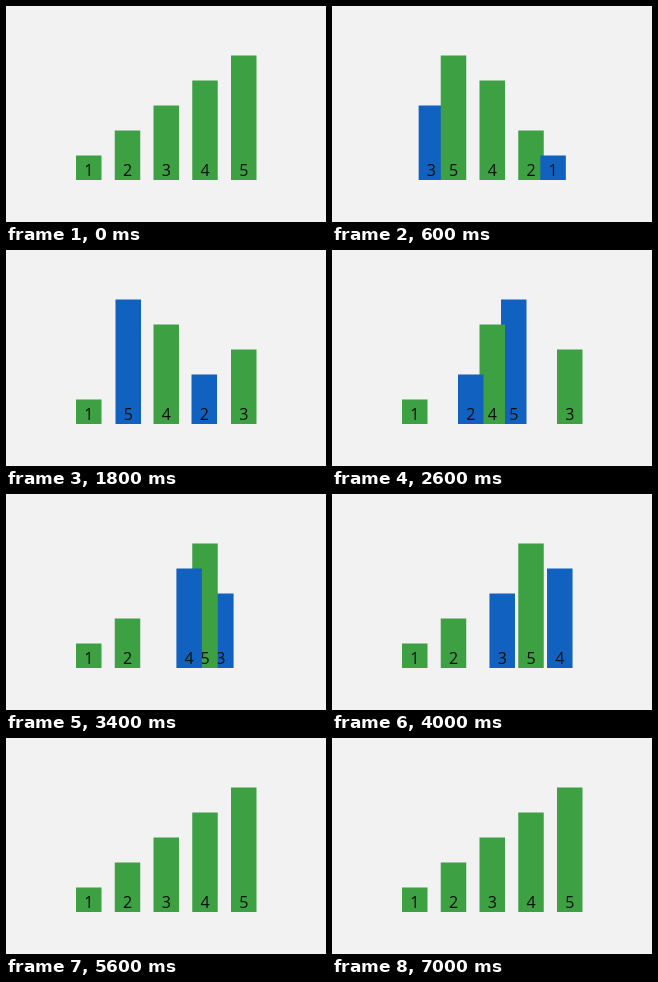
Recreate the animation shown at these times as an HTML page with a canvas. Size 320 by 216 pixels, loop 7.2 s.

```html
<!DOCTYPE html>
<html lang="en">
<head>
<meta charset="utf-8">
<title>Sorting bars</title>
<style>
  html, body { margin: 0; width: 100%; height: 100%; overflow: hidden; background: #f2f2f2; }
  canvas { display: block; width: 320px; height: 216px; }
</style>
</head>
<body>
<canvas id="stage"></canvas>
<script>
const W = 320, H = 216, LOOP = 7200, STEP = 200;
const LEFT = 70, PITCH = 38.75, BAR = 25.5, UNIT = 25, BASE = 174;
const GREEN = '#3da043', BLUE = '#1061c0';
const START = [3, 5, 4, 2, 1];
const SWAPS = [[0, 4], [1, 3], [2, 4], [3, 4]];
const FIRST = 488, PERIOD = 1302, MOVE = 1042;

const canvas = document.getElementById('stage');
const ctx = canvas.getContext('2d');
const ratio = window.devicePixelRatio || 1;
canvas.width = W * ratio;
canvas.height = H * ratio;
ctx.scale(ratio, ratio);
ctx.font = '16px "Open Sans", "Noto Sans", sans-serif';
ctx.textAlign = 'center';

function drawBar(value, slot, active) {
  const x = LEFT + slot * PITCH;
  const height = value * UNIT - 0.5;
  ctx.fillStyle = active ? BLUE : GREEN;
  ctx.fillRect(x, BASE - height, BAR, height);
  ctx.fillStyle = '#0b0f0b';
  ctx.fillText(value, x + BAR / 2, 170);
}

// Slot of every value, plus the pair being exchanged at this time.
function layout(time) {
  const order = START.slice();
  const slots = {};
  let moving = [];
  SWAPS.forEach(([a, b], i) => {
    const p = (time - FIRST - i * PERIOD) / MOVE;
    if (p < 0) return;
    if (p < 1) {
      moving = [order[a], order[b]];
      slots[order[a]] = a + (b - a) * p;
      slots[order[b]] = b - (b - a) * p;
    } else {
      [order[a], order[b]] = [order[b], order[a]];
    }
  });
  order.forEach((value, i) => {
    if (!(value in slots)) slots[value] = i;
  });
  return { slots, moving };
}

function draw(time) {
  ctx.fillStyle = '#f2f2f2';
  ctx.fillRect(0, 0, W, H);
  // The loop opens with a glimpse of the sorted result.
  const { slots, moving } = layout(time < STEP ? LOOP : time);
  for (const value of START) drawBar(value, slots[value], moving.includes(value));
}

function tick() {
  const time = performance.now() % LOOP;
  draw(Math.floor(time / STEP) * STEP);
  requestAnimationFrame(tick);
}
tick();
</script>
</body>
</html>
```
